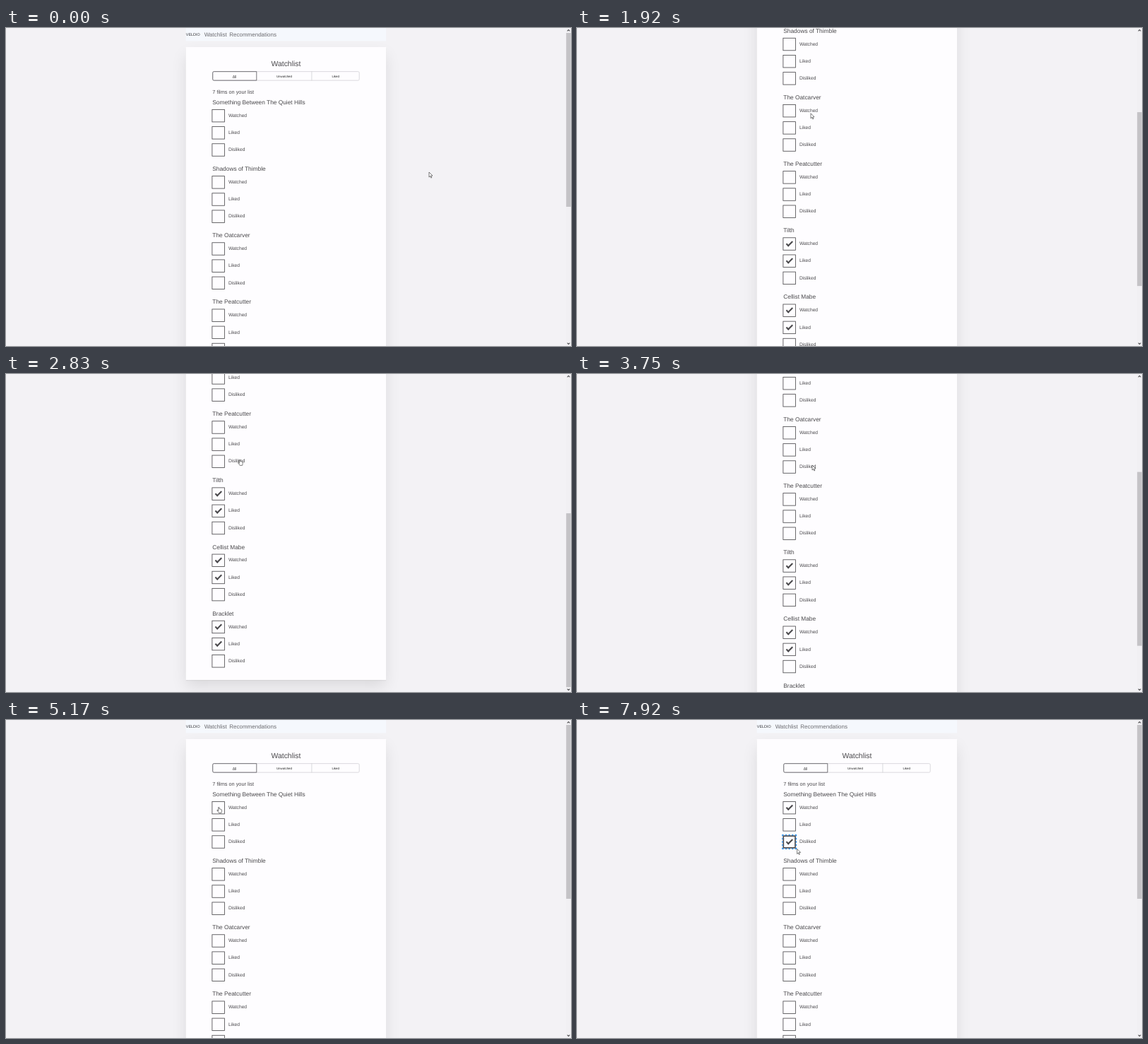
Animation of 800x450 px, one loop 8 s. Source, as an HTML page with a canvas:

```html
<!DOCTYPE html>
<html lang="en">
<head>
<meta charset="utf-8">
<title>Watchlist</title>
<style>
  html, body { margin: 0; width: 100%; height: 100%; overflow: hidden; background: #f3f2f5; }
  canvas { display: block; width: 800px; height: 450px; }
</style>
</head>
<body>
<canvas id="stage" width="800" height="450"></canvas>
<script>
const ctx = document.getElementById('stage').getContext('2d');
const LOOP = 8000, STEP = 1000 / 12;
const Z = 2.4;                       // page pixels per stage pixel
const FONT = '"Liberation Sans", Arial, sans-serif';
const INK = '#4a494c';
const LEFT = 701.5, CARD = 611.5, CARD_W = 680;

const films = [
  { title: 'Something Between The Quiet Hills' },
  { title: 'Shadows of Thimble' },
  { title: 'The Oatcarver' },
  { title: 'The Peatcutter' },
  { title: 'Tilth', seen: true },
  { title: 'Cellist Mabe', seen: true },
  { title: 'Bracklet', seen: true }
];
const options = ['Watched', 'Liked', 'Disliked'];

// Keys are [step, value, ...] with straight runs between them.
const scrollKeys = [
  [15, 0], [16, 4.2], [17, 20], [23, 195.3], [24, 222], [25, 242], [26, 250],
  [28, 250], [29, 254], [30, 270], [32, 314], [33, 328], [34, 331.2],
  [40, 331.2], [41, 327], [42, 306], [49, 127], [52, 52], [53, 30], [54, 13], [55, 3], [56, 0]
];
const pointerKeys = [
  [0, 599, 204], [1, 592, 201], [3, 540, 180], [7, 400, 137], [10, 352.8, 124.6],
  [11, 343, 122], [13, 331, 120.8], [41, 331, 120.8], [49, 335, 137], [55, 335, 137],
  [58, 313, 132], [60, 303, 127], [62, 301.3, 123],
  [69, 301.3, 123], [71, 306, 138], [73, 311.8, 152.6], [76, 311.8, 152.6], [78, 313, 153.6],
  [79, 313, 153.6], [81, 308, 163], [83, 301.6, 172.6],
  [90, 301.6, 172.6], [93, 307, 179], [95, 311.6, 182.4]
];
const handSpans = [[11, 17], [34, 42], [59, 93]];

function at(keys, n) {
  if (n <= keys[0][0]) return keys[0].slice(1);
  for (let i = 1; i < keys.length; i++) {
    const a = keys[i - 1], b = keys[i];
    if (n <= b[0]) {
      const k = (n - a[0]) / (b[0] - a[0]);
      return a.slice(1).map((v, j) => v + (b[j + 1] - v) * k);
    }
  }
  return keys[keys.length - 1].slice(1);
}

function text(str, x, y, size, color = INK, align = 'left') {
  ctx.font = size + 'px ' + FONT;
  ctx.textAlign = align;
  ctx.fillStyle = color;
  ctx.fillText(str, x, y);
}

function rect(x, y, w, h, color) {
  ctx.fillStyle = color;
  ctx.fillRect(x, y, w, h);
}

function frame(x, y, w, h, width, color) {
  ctx.strokeStyle = color;
  ctx.lineWidth = width;
  ctx.strokeRect(x + width / 2, y + width / 2, w - width, h - width);
}

function poly(points) {
  ctx.beginPath();
  for (let i = 0; i < points.length; i += 2) ctx.lineTo(points[i], points[i + 1]);
  ctx.closePath();
}

function shadow(dy, blur, alpha) {
  ctx.shadowColor = `rgba(0,0,0,${alpha})`;
  ctx.shadowOffsetY = dy / Z;
  ctx.shadowBlur = blur / Z;
}

function drawCard() {
  ctx.save();
  shadow(25, 50, 0.1);
  rect(CARD, 65, CARD_W, 1769, '#fefdff');
  shadow(2, 4, 0.2);
  rect(CARD, 65, CARD_W, 1769, '#fefdff');
  ctx.restore();
}

function drawNav() {
  rect(CARD, 0, CARD_W, 44, '#f5f8fd');
  text('VELDIO', 611.5, 26.5, 13, '#333236');
  text('Watchlist', 673.5, 29.5, 19.2, '#6c6c70');
  text('Recommendations', 759, 29.5, 19.2, '#6c6c70');
}

function drawTabs() {
  const y = 147, h = 32;
  ctx.lineWidth = 2;
  ctx.strokeStyle = '#d3d2d6';
  ctx.beginPath();
  ctx.roundRect(LEFT + 1, y + 1, 498, h - 2, 4);
  ctx.moveTo(1039, y);
  ctx.lineTo(1039, y + h);
  ctx.stroke();
  ctx.strokeStyle = '#5c5b5f';
  ctx.beginPath();
  ctx.roundRect(LEFT + 1, y + 1, 149, h - 2, [4, 0, 0, 4]);
  ctx.stroke();
  text('All', 776, 167.5, 10.6, '#222', 'center');
  rect(769.5, 169, 13, 1, '#222');
  text('Unwatched', 945.5, 167.5, 10.6, '#222', 'center');
  text('Liked', 1120, 167.5, 10.6, '#222', 'center');
}

function drawTick(cx, cy) {
  ctx.save();
  ctx.translate(cx, cy);
  ctx.rotate(-Math.PI / 4);
  rect(-11.5, -6, 5, 12, INK);
  rect(-11.5, 1, 23, 5, INK);
  ctx.restore();
}

function drawBox(y, checked, focused) {
  const x = LEFT - 2;
  frame(x, y, 44, 44, focused ? 4 : 2, INK);
  if (focused) {
    ctx.strokeStyle = '#228bec';
    ctx.lineWidth = 3;
    ctx.setLineDash([6, 5]);
    const l = x - 3, t = y - 3, e = 50, m = 1.5;
    ctx.beginPath();
    ctx.moveTo(l, t + m);         ctx.lineTo(l + e, t + m);
    ctx.moveTo(l, t + e - m);     ctx.lineTo(l + e, t + e - m);
    ctx.moveTo(l + m, t);         ctx.lineTo(l + m, t + e);
    ctx.moveTo(l + e - m, t);     ctx.lineTo(l + e - m, t + e);
    ctx.stroke();
    ctx.setLineDash([]);
  }
  if (checked) drawTick(x + 22.5, y + 19);
}

function drawFilm(film, i, n) {
  const top = 226 * i;
  text(film.title, LEFT, 259 + top, 20);
  options.forEach((name, j) => {
    const y = 276 + top + 58 * j;
    let checked = film.seen && j < 2, focused = false;
    if (i === 0) {
      checked = (j === 0 && n >= 68) || (j === 2 && n >= 86);
      focused = (j === 0 && n >= 67 && n < 85) || (j === 2 && n >= 85);
    }
    drawBox(y, checked, focused);
    text(name, 756, y + 26, 16);
  });
}

function drawScrollbar(scroll) {
  rect(793, 0, 7, 450, '#f1f0f3');
  rect(793.2, 7 + scroll * 0.574, 6.5, 246, '#c4c3c6');
  ctx.strokeStyle = '#505052';
  ctx.lineWidth = 1.1;
  for (const [y, d] of [[2.6, 1], [447.4, -1]]) {
    ctx.beginPath();
    ctx.moveTo(794.7, y + 1.8 * d);
    ctx.lineTo(796.5, y);
    ctx.lineTo(798.3, y + 1.8 * d);
    ctx.stroke();
  }
}

function drawPointer(x, y, hand) {
  ctx.save();
  ctx.translate(x, y);
  ctx.scale(1 / Z, 1 / Z);
  if (hand) {
    ctx.translate(-6.5, -0.5);
    poly([5, 14, 5, 2, 6.5, 0.5, 8, 2, 8, 7, 10.5, 7, 11, 8, 13, 8, 14, 9, 16, 9.5,
      16.5, 11, 16.5, 16, 15, 21, 7, 21, 3, 15.5, 0.5, 12.5, 1, 11, 3, 11.5]);
  } else {
    poly([0, 0, 0, 17, 4, 13.3, 6.8, 19.5, 9.2, 18.4, 6.5, 12.5, 12, 12]);
  }
  ctx.fillStyle = '#fff';
  ctx.fill();
  ctx.strokeStyle = '#222';
  ctx.lineWidth = 1.4;
  ctx.lineJoin = 'round';
  ctx.stroke();
  ctx.restore();
}

function draw(ms) {
  const n = Math.min(95, Math.floor((ms % LOOP + 3.4) / STEP));
  const [scroll] = at(scrollKeys, n);
  const [px, py] = at(pointerKeys, n);

  rect(0, 0, 800, 450, '#f3f2f5');
  ctx.save();
  ctx.scale(1 / Z, 1 / Z);
  ctx.translate(0, -scroll * Z);
  drawCard();
  drawNav();
  text('Watchlist', 951.5, 129, 25, INK, 'center');
  drawTabs();
  text('7 films on your list', LEFT, 224, 17.6);
  films.forEach((film, i) => drawFilm(film, i, n));
  ctx.restore();

  drawScrollbar(scroll);
  drawPointer(px, py, handSpans.some(([a, b]) => n >= a && n <= b));
}

ctx.textRendering = 'geometricPrecision';
const start = performance.now();
function tick() {
  draw(performance.now() - start);
  requestAnimationFrame(tick);
}
tick();
</script>
</body>
</html>
```
